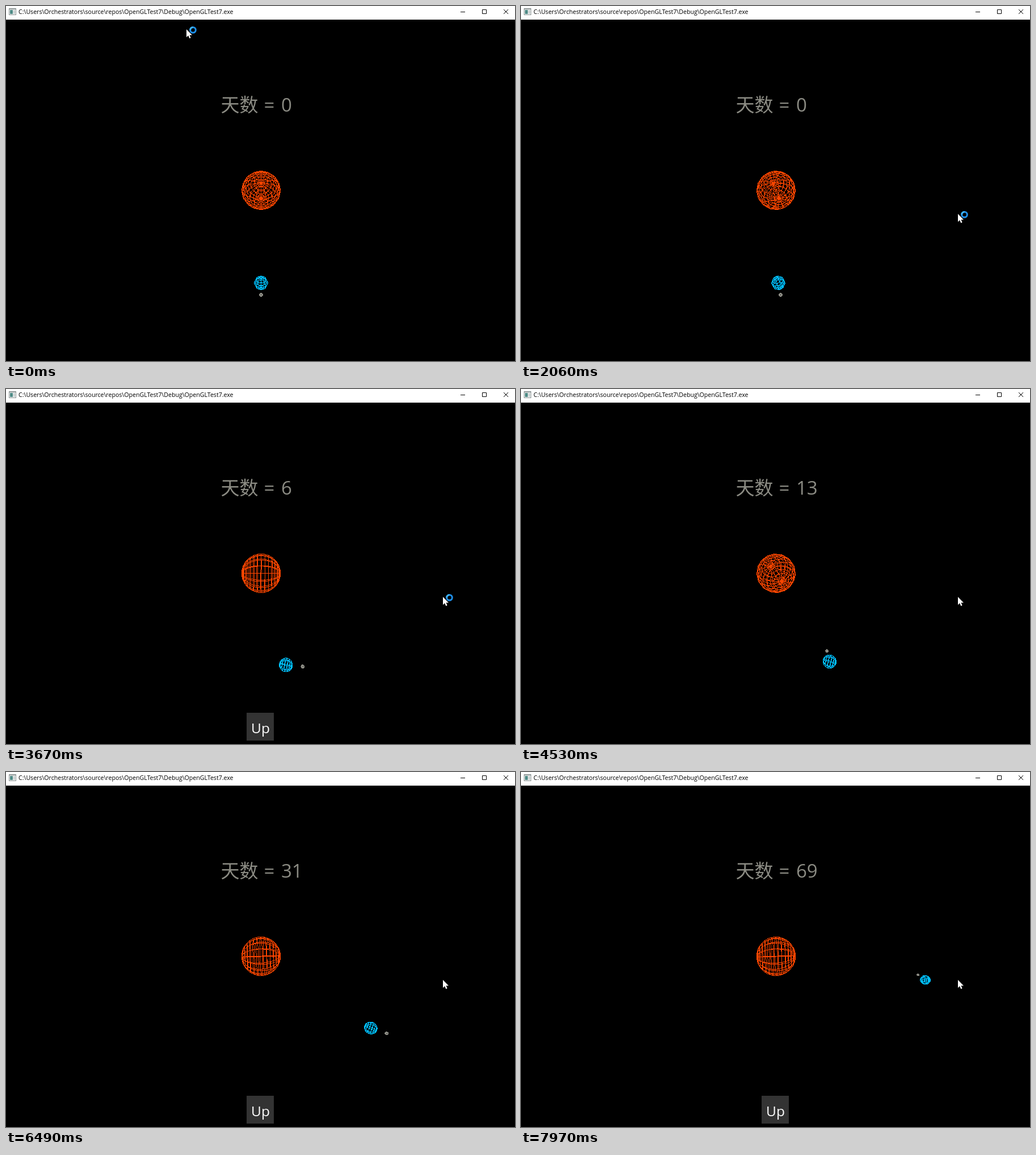
These frames come from a looping animation (897x625 px, 8 s). An HTML page with a canvas:

```html
<!DOCTYPE html>
<html lang="zh">
<head>
<meta charset="utf-8">
<title>OpenGLTest7</title>
<style>
  html, body { margin: 0; width: 100%; height: 100%; overflow: hidden; background: #000; }
  canvas, svg { position: absolute; left: 0; top: 0; display: block; }
  text { white-space: pre; font-family: "Open Sans", sans-serif; }
  .cjk { font-family: "Noto Sans CJK SC", "Noto Sans CJK", sans-serif; }
</style>
</head>
<body>
<canvas id="space" width="897" height="625"></canvas>
<svg width="897" height="625" viewBox="0 0 897 625">
  <rect width="897" height="24" fill="#fff"/>

  <g shape-rendering="crispEdges">
    <rect x="5" y="4" width="13" height="12" fill="#8c9494"/>
    <rect x="6" y="6" width="11" height="9" fill="#f2f4f4"/>
    <rect x="7" y="7" width="5" height="7" fill="#4f8a86"/>
    <rect x="13" y="7" width="3" height="7" fill="#c9d0d0"/>
  </g>
  <text x="22" y="14.3" font-size="10.6">C:\Users\Orchestrators\source\repos\OpenGLTest7\Debug\OpenGLTest7.exe</text>
  <path d="M801 10.5h8M839.5 6.5h7v7h-7zM877 6l8 8m0-8l-8 8" fill="none" stroke="#000"/>

  <g fill="#8b8b83" font-size="33">
    <text class="cjk" x="378.5" y="186">天数</text>
    <text x="454.5" y="186">=</text>
    <text id="count" x="485" y="186">0</text>
  </g>

  <g id="key">
    <rect x="424" y="570" width="48" height="49" fill="#333"/>
    <text x="448.5" y="605.5" font-size="24.5" fill="#fff" text-anchor="middle">Up</text>
  </g>

  <g id="cursor">
    <path d="M0 0V14L3.2 11 5.3 16 7.6 15 5.5 10.3H10z" fill="#fff"/>
    <g id="busy" fill="none" stroke-width="3">
      <circle cx="11.5" cy="1.2" r="4.8" stroke="#1e8fe8"/>
      <path d="M6.7 1.2a4.8 4.8 0 0 1 4.8 -4.8" stroke="#3fb4f6"/>
    </g>
  </g>
</svg>
<script>
const LOOP = 8000;
const TAU = Math.PI * 2;
const el = id => document.getElementById(id);
const [space, count, key, cursor, busy] = ['space', 'count', 'key', 'cursor', 'busy'].map(el);
const ctx = space.getContext('2d');

// Camera at (0, 6, 14) looking at the origin, 60 degree field of view
const DIST = Math.hypot(6, 14);
const SIN = 6 / DIST, COS = 14 / DIST;
const FOCAL = 300 / Math.tan(Math.PI / 6);

function project(x, y, z) {
  const k = FOCAL / (DIST - y * SIN - z * COS);
  return [449.5 + x * k, 324.5 - (y * COS - z * SIN) * k];
}

// One-pixel line without smoothing: one pixel per step of the longer axis
function line(p, q) {
  const steep = Math.abs(q[1] - p[1]) > Math.abs(q[0] - p[0]);
  const m = steep ? 1 : 0, n = 1 - m;
  if (p[m] > q[m]) [p, q] = [q, p];
  const slope = (q[n] - p[n]) / (q[m] - p[m]);
  for (let a = Math.round(p[m]); a + .5 < q[m]; a++) {
    const b = Math.floor(p[n] + (a + .5 - p[m]) * slope);
    ctx.fillRect(steep ? b : a, steep ? a : b, 1, 1);
  }
}

// Wire sphere with its poles on the z axis, turned about y by spin
function sphere(color, cx, cz, r, n, spin) {
  const cs = Math.cos(spin), sn = Math.sin(spin);
  const point = (i, j) => {
    const lat = Math.PI * i / n, lon = TAU * j / n;
    const x = r * Math.sin(lat) * Math.cos(lon);
    const y = r * Math.sin(lat) * Math.sin(lon);
    const z = r * Math.cos(lat);
    return project(cx + x * cs + z * sn, y, cz - x * sn + z * cs);
  };
  ctx.fillStyle = color;
  for (let i = 0; i < n; i++) {
    for (let j = 0; j < n; j++) {
      const p = point(i, j);
      line(p, point(i + 1, j));
      if (i) line(p, point(i, j + 1));
    }
  }
}

// Elapsed days; every press of Up raises the rate
const DAYS = [[0, 0], [2130, .566], [2910, .98], [3000, 1.08], [3100, 1.4], [3200, 2.1],
  [4530, 13.63], [5450, 21.66], [6380, 29.63], [6490, 31.53], [7280, 45.18], [8000, 70.1]];
const PRESSES = [[2130, 2880], [2950, 3900], [6380, 7150], [7280, 8000]];

function dayAt(t) {
  const i = DAYS.findIndex(p => p[0] > t);
  const [t0, d0] = DAYS[i - 1], [t1, d1] = DAYS[i];
  return d0 + (d1 - d0) * (t - t0) / (t1 - t0);
}

const easeOut = (u, p) => 1 - Math.pow(1 - u, p);
const show = (node, on) => node.setAttribute('visibility', on ? 'visible' : 'hidden');

function draw(t) {
  const day = dayAt(t);
  const orbit = TAU * day / 365;
  const lunar = orbit + TAU * day / 29.5;
  const ex = 7 * Math.sin(orbit), ez = 7 * Math.cos(orbit);

  ctx.fillStyle = '#000';
  ctx.fillRect(0, 0, space.width, space.height);
  sphere('#ff4500', 0, 0, 1, 16, TAU * day / 25);
  sphere('#00bfff', ex, ez, .2, 8, orbit + TAU * day);
  sphere('#8b8b83', ex + .5 * Math.sin(lunar), ez + .5 * Math.cos(lunar), .05, 6, lunar);
  count.textContent = Math.floor(day);

  const u = Math.min(1, Math.max(0, (t - 850) / 850));
  const x = 318.5 + 452 * easeOut(u, 1.885), y = 41 + 325 * easeOut(u, 3.1);
  cursor.setAttribute('transform', `translate(${Math.floor(x)} ${Math.round(y)})`);
  show(busy, t < 4300);
  show(key, PRESSES.some(([from, to]) => t >= from && t < to));
}

const start = performance.now();
function tick() {
  draw((performance.now() - start) % LOOP);
  requestAnimationFrame(tick);
}
tick();
</script>
</body>
</html>
```
